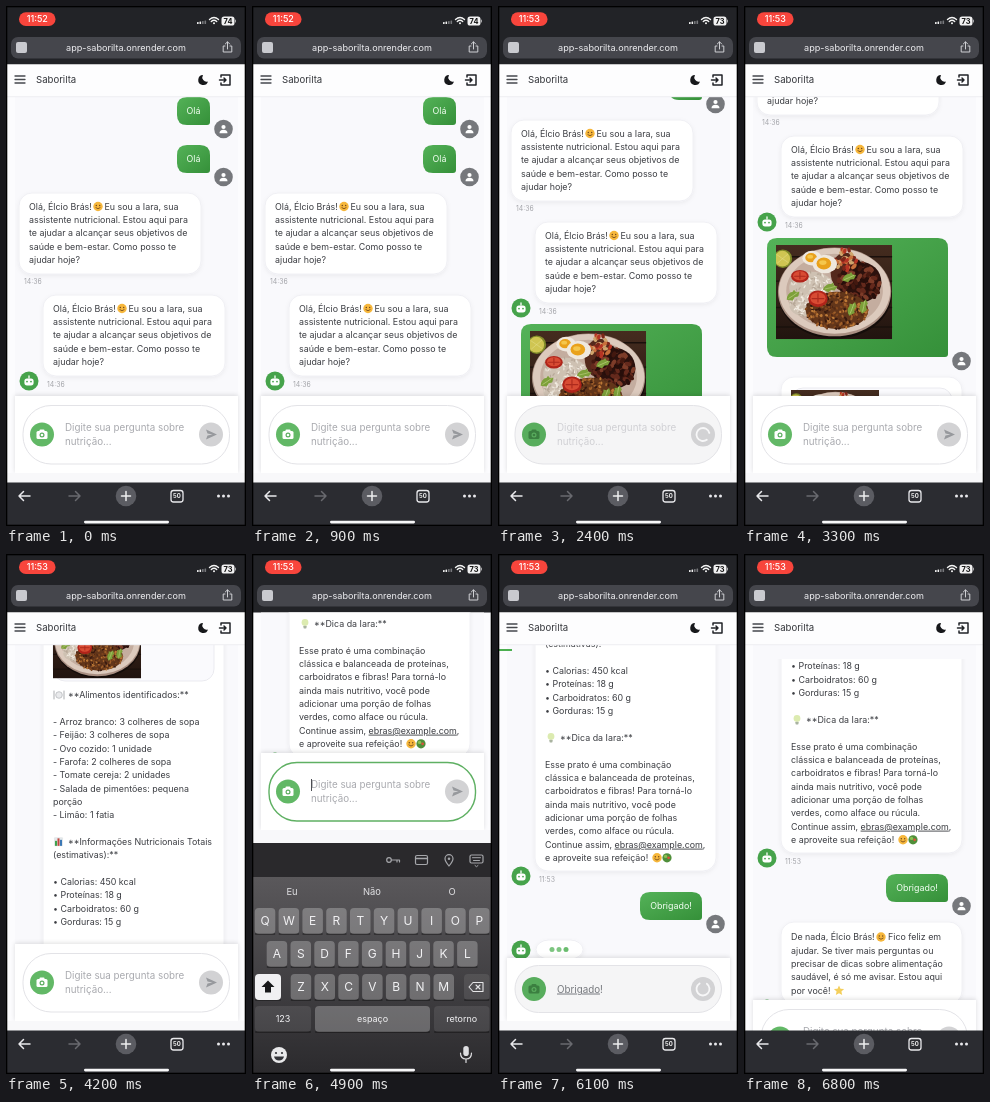
Write an HTML page that moves like this. It is 240 px wide and 520 px high and loops after 6.9 s.

```html
<!DOCTYPE html>
<html lang="pt-BR">
<head>
<meta charset="utf-8">
<title>Chat de nutrição</title>
<style>
  html, body { margin: 0; width: 100%; height: 100%; overflow: hidden; background: #000; }
  svg { display: block; width: 240px; height: 520px; font-family: Inter, "Open Sans", sans-serif; }
  text { white-space: pre; }
</style>
</head>
<body>
<svg id="stage" viewBox="0 0 240 520"></svg>
<script>
const LOOP = 6900, STEP = 100;
const LINE = 13.35, SIZE = 8.9;

// --- drawing helpers; text is placed by its vertical middle ---
const text = (x, y, s, { size = SIZE, fill = '#3b3d42', anchor = 'start', weight = 400 } = {}) =>
  `<text x="${x}" y="${y + size * 0.36}" font-size="${size}" fill="${fill}" text-anchor="${anchor}" font-weight="${weight}">${s}</text>`;
const rect = (x, y, w, h, fill, r = 0, more = '') =>
  `<rect x="${x}" y="${y}" width="${w}" height="${h}" rx="${r}" fill="${fill}" ${more}/>`;
const oval = (x, y, rx, ry, fill, more = '') =>
  `<ellipse cx="${x}" cy="${y}" rx="${rx}" ry="${ry}" fill="${fill}" ${more}/>`;
const dot = (x, y, r, fill, more = '') => oval(x, y, r, r, fill, more);
const line = (d, stroke, w = 1.4) =>
  `<path d="${d}" fill="none" stroke="${stroke}" stroke-width="${w}" stroke-linecap="round" stroke-linejoin="round"/>`;
const shape = (d, fill) => `<path d="${d}" fill="${fill}"/>`;
const group = (id, body) => `<g id="${id}">${body}</g>`;

// --- small pictures ---
const smile = (x, y) => dot(x, y, 4.7, '#f6b73c') + dot(x - 1.7, y - 1, .7, '#6b421b') +
  dot(x + 1.7, y - 1, .7, '#6b421b') + line(`M${x - 2.2} ${y + 1.2}q2.2 2.4 4.4 0`, '#6b421b', .8);
const salad = (x, y) => dot(x, y, 4.6, '#4f8f3a') + dot(x - 1.4, y - 1.4, 1.7, '#8cc152') + dot(x + 1.6, y, 1.4, '#d9533c');
const bulb = (x, y) => dot(x, y - 1.2, 3.4, '#dcebb0') + rect(x - 1.5, y + 2, 3, 2.8, '#a9b3a0', .7);
const chart = (x, y) => rect(x - 4.5, y - 4.5, 9, 9, '#e4e8ea', 1) + rect(x - 3.5, y - 1, 2, 5, '#3fa34d') +
  rect(x - 1, y - 3.5, 2, 7.5, '#c0483f') + rect(x + 1.5, y - 2, 2, 6, '#3c78b5');
const dish = (x, y) => dot(x, y, 3.3, '#e9eaec', 'stroke="#b7b9bd" stroke-width=".8"') +
  line(`M${x - 5} ${y - 4}v8M${x + 5} ${y - 4}v8`, '#a2a4a8', .9);
const star = (x, y) => shape(`M${x} ${y - 5}l1.5 3.3 3.6.4-2.7 2.4.8 3.6-3.2-1.8-3.2 1.8.8-3.6-2.7-2.4 3.6-.4z`, '#f4cf5c');

const bot = (x, y) => dot(x, y, 9.5, '#46a34b') + rect(x - 4.6, y - 2.6, 9.2, 7, '#fff', 2.6) +
  line(`M${x} ${y - 3}v-2`, '#fff', 1.3) + dot(x - 2, y + .6, .9, '#46a34b') + dot(x + 2, y + .6, .9, '#46a34b');
const person = y => dot(217.5, y, 9.3, '#76787c') + dot(217.5, y - 2, 2.1, '#fff') +
  shape(`M213.5 ${y + 4.3}q0-3.6 4-3.6t4 3.6z`, '#fff');

const card = (x, y, w, h) => rect(x, y, w, h, '#fff', 13, 'stroke="#ececf1" stroke-width=".8" filter="url(#soft)"');
const sentBox = (x, y, w, h) =>
  shape(`M${x + 10} ${y}h${w - 20}q10 0 10 10v${h - 13}q0 3-3 3h${13 - w}q-10 0-10-10v${20 - h}q0-10 10-10z`, 'url(#leaf)');
const sent = (x, y, w, s) => sentBox(x, y, w, 28) +
  text(x + w / 2, y + 14, s, { fill: '#f3fff3', anchor: 'middle' }) + person(y + 32);
const stamp = (x, y, s) => text(x, y, s, { size: 6.9, fill: '#a3a4a9' });
const lines = (x, y, list) => list.map((s, i) => s && text(x, y + i * LINE, s)).join('');

function seeded(seed) {
  return () => (seed = (seed * 16807) % 2147483647) / 2147483647;
}

function food() {
  const rnd = seeded(41);
  const scatter = (n, x, y, rx, ry, a, b, fills) => Array.from({ length: n }, (_, i) => {
    const q = rnd() * 6.283, d = Math.sqrt(rnd());
    const cx = (x + Math.cos(q) * d * rx).toFixed(1), cy = (y + Math.sin(q) * d * ry).toFixed(1);
    return oval(cx, cy, a, b, fills[i % fills.length], `transform="rotate(${(rnd() * 180) | 0} ${cx} ${cy})"`);
  }).join('');
  const leaf = (x, y, a) => `<g transform="translate(${x} ${y}) rotate(${a})">` +
    shape('M-15 3Q-9-10 2-8L6-11 8-5 15-3 9 5 2 4-4 9z', '#7da03a') + line('M-10 2Q0 0 10-3', '#b9cf7c', 1.4) + '</g>';
  const tomato = (x, y, rx, ry) => oval(x, y, rx, ry, '#b0241a') + oval(x, y - 1, rx * .78, ry * .72, '#d84b33') +
    line(`M${x - rx * .6} ${y}h${rx * 1.2}M${x} ${y - ry * .6}v${ry}`, '#ad2a1d', 2.4);
  const egg = (x, y, rx, ry) => oval(x, y, rx, ry, '#efe8de') + oval(x - 2, y - 1, rx * .6, ry * .64, '#e9a11c') +
    oval(x - 4, y - 3, rx * .3, ry * .26, '#f5c74c');
  const rice = ['#ece5da', '#b7a898', '#d9cdbf', '#f4eee4'];
  return rect(0, 0, 238, 193, 'url(#wood)') +
    [24, 74, 128, 168].map(y => line(`M0 ${y}H238`, '#1a100c', 3)).join('') +
    dot(14, 28, 19, '#7f8a28') + dot(13, 28, 16, '#cfc552') + line('M2 20L25 36M3 37L24 19', '#e6e092', 1) +
    oval(121, 102, 116, 90, '#150d0a') + oval(120, 96, 116, 91, '#a98f82') +
    oval(120, 94, 114, 88, '#dccabd') + oval(120, 94, 99, 76, '#c4ad9f') +
    oval(142, 56, 30, 40, '#54291c') +
    oval(73, 88, 46, 33, '#cec1b2') + oval(57, 122, 30, 24, '#cec1b2') +
    scatter(110, 73, 88, 45, 33, 3.6, 1.4, rice) + scatter(55, 57, 122, 29, 23, 3.6, 1.4, rice) +
    oval(172, 76, 44, 42, '#2b110d') +
    scatter(85, 172, 76, 43, 41, 6.5, 4.2, ['#43180f', '#64291c', '#270e0a', '#7d3c29']) +
    scatter(34, 143, 31, 22, 23, 5.5, 3.6, ['#b63424', '#c8703c', '#cfa56d', '#7c2619']) +
    oval(125, 134, 64, 38, '#63361a') +
    scatter(220, 125, 134, 64, 39, 3.2, 2.2, ['#a05f2a', '#532a15', '#bd7a37', '#84481d', '#37190f']) +
    egg(74, 27, 20, 15) + egg(100, 39, 25, 19) + tomato(49, 64, 18, 13) + tomato(86, 110, 20, 17) +
    leaf(35, 104, -20) + leaf(111, 88, 0) + leaf(150, 67, -10) + leaf(156, 131, -55) + leaf(180, 126, -65);
}

// --- conversation, in scroll coordinates ---
function chat() {
  const hello = (x, y) => card(x, y, 182, 81) +
    text(x + 10, y + 13.5, 'Olá, Élcio Brás!') + smile(x + 79, y + 13.5) + text(x + 85.5, y + 13.5, 'Eu sou a Iara, sua') +
    lines(x + 10, y + 13.5 + LINE, ['assistente nutricional. Estou aqui para',
      'te ajudar a alcançar seus objetivos de', 'saúde e bem-estar. Como posso te', 'ajudar hoje?']);
  const dots = (id, y) => group(id, bot(23, y + 10) + card(38, y, 47, 19) +
    [54, 61, 68].map(x => dot(x, y + 9.5, 2.5, '#4caf50', 'class="beat"')).join(''));
  const row = i => 631 + i * LINE;
  const reply = card(37, 530, 181, 488) +
    rect(47, 541, 161, 76, '#fafafd', 12, 'stroke="#e6e6ec" stroke-width=".8"') +
    '<use href="#food" transform="translate(47 543) scale(.37)"/>' +
    dish(53, row(0)) + text(62, row(0), '**Alimentos identificados:**') +
    lines(47, row(2), ['- Arroz branco: 3 colheres de sopa', '- Feijão: 3 colheres de sopa', '- Ovo cozido: 1 unidade',
      '- Farofa: 2 colheres de sopa', '- Tomate cereja: 2 unidades', '- Salada de pimentões: pequena', 'porção', '- Limão: 1 fatia']) +
    chart(52.5, row(11)) + text(62, row(11), '**Informações Nutricionais Totais') +
    lines(47, row(12), ['(estimativas):**', '', '• Calorias: 450 kcal', '• Proteínas: 18 g', '• Carboidratos: 60 g', '• Gorduras: 15 g']) +
    bulb(53, row(19)) + text(62, row(19), '**Dica da Iara:**') +
    lines(47, row(21), ['Esse prato é uma combinação', 'clássica e balanceada de proteínas,',
      'carboidratos e fibras! Para torná-lo', 'ainda mais nutritivo, você pode', 'adicionar uma porção de folhas',
      'verdes, como alface ou rúcula.',
      'Continue assim, <tspan text-decoration="underline">ebras@example.com</tspan>,', 'e aproveite sua refeição!']) +
    smile(159, row(28)) + salad(169, row(28)) + bot(23, 1023) + stamp(41, 1027, '11:53');
  const thanks = card(37, 1087, 181, 82) + text(47, 1102, 'De nada, Élcio Brás!') + smile(137, 1102) + text(144, 1102, 'Fico feliz em') +
    lines(47, 1102 + LINE, ['ajudar. Se tiver mais perguntas ou', 'precisar de dicas sobre alimentação',
      'saudável, é só me avisar. Estou aqui', 'por você!']) + star(95, 1102 + 4 * LINE) + bot(23, 1174);
  return sent(171, 91, 33, 'Olá') + sent(171, 139, 33, 'Olá') +
    hello(13, 187) + stamp(18, 276, '14:36') + hello(37, 289) + bot(23, 375) + stamp(41, 379, '14:36') +
    group('photo', sentBox(23, 391, 181, 119) + '<use href="#food" transform="translate(32 398) scale(.488)"/>' + person(514)) +
    dots('wait1', 530) + group('reply', reply) + group('sent', sent(142, 1039, 62, 'Obrigado!')) +
    dots('wait2', 1087) + group('thanks', thanks);
}

const header = rect(1, 57, 238, 34, '#fdfdfe') + rect(1, 90.4, 238, .8, '#e9e9ee') +
  line('M9 70h10M9 73.5h10M9 77h10', '#46484d', 1.3) + text(30, 73.2, 'Saborilta', { size: 9.6, fill: '#34363b' }) +
  shape('M197 69a5 5 0 1 0 5 6.5a4.4 4.4 0 0 1-5-6.5z', '#17181b') +
  line('M215 71v-2h9v10h-9v-2M213.5 74h6.5M218 72l2 2-2 2', '#222428', 1.5);

const panel = `<rect id="tray" x="9" width="223" fill="#fff" filter="url(#lift)"/>` +
  rect(1, 467, 238, 14, '#f8f8fa') +
  `<rect id="pill" x="17" width="206.5"/>` +
  group('hint', text(59, 421.5, 'Digite sua pergunta sobre', { size: 9.8, fill: 'currentColor' }) +
    text(59, 435, 'nutrição...', { size: 9.8, fill: 'currentColor' })) +
  text(59, 435, '<tspan id="word" text-decoration="underline"></tspan><tspan id="bang"></tspan>', { size: 9.8, fill: '#777a7f' }) +
  rect(59, 416, 1, 12, '#4c4e53', 0, 'id="caret"') +
  group('tools', dot(36, 428.5, 12, '#62b866', 'id="cam"') +
    group('lens', rect(30.5, 425, 11, 8, 'currentColor', 1.5) + rect(33.5, 423.4, 5, 3, 'currentColor', 1) +
      dot(36, 429, 2.5, '#5aad5e') + dot(36, 429, 1.3, 'currentColor')) +
    dot(205, 428.5, 12, '#d2d2d4') + group('arrow', shape('M200 423.5l11 5-11 5 1.5-4 5-1-5-1z', '#97999d')) +
    group('spin', line('M205 422a6.5 6.5 0 1 1-6 4', '#f7f7f8', 1.8)));

const bottomBar = rect(1, 476.5, 238, 43, '#2b2c31') +
  line('M24 490H13M17.5 485.5L13 490l4.5 4.5', '#e9e9ec', 1.5) + line('M63 490h11M69.5 485.5L74 490l-4.5 4.5', '#696a6f', 1.5) +
  dot(120, 490, 10.3, '#5b5c62') + line('M115.5 490h9M120 485.5v9', '#eeeef0', 1.5) +
  rect(165, 484.5, 12, 11.5, 'none', 2.5, 'stroke="#e9e9ec" stroke-width="1.3"') +
  text(171, 490.3, '50', { size: 6, fill: '#eee', anchor: 'middle', weight: 700 }) +
  [212.5, 217.5, 222.5].map(x => dot(x, 490, 1.5, '#e9e9ec')).join('');

const addressBar = rect(1, 1, 238, 58, '#222327') + rect(5, 31, 230, 21.5, '#45464c', 7) +
  rect(10, 36, 11, 11, '#c9cacf', 2) +
  text(120, 41.5, 'app-saborilta.onrender.com', { size: 9.1, fill: '#eeeef1', anchor: 'middle' }) +
  line('M219 40h-1.8v6h8.6v-6H224M221.5 43v-7M219.3 38l2.2-2.2 2.2 2.2', '#cfd0d4', 1);

function keyboard() {
  const light = 'rgba(255,255,255,.26)', dark = 'rgba(255,255,255,.09)', pale = '#a5a6aa';
  const key = (x, y, w, s, fill = light, size = 12) => rect(x, y + 25, w, 2, 'rgba(0,0,0,.35)', 1) + rect(x, y, w, 26, fill, 4) +
    text(x + w / 2, y + 13, s, { size, fill: '#f1f1f3', anchor: 'middle' });
  const row = (s, x, y) => [...s].map((c, i) => key(x + i * 23.8, y, 20.5, c)).join('');
  const outline = `stroke="${pale}" stroke-width="1.2"`;
  return rect(1, 289, 238, 34, '#2a292c') + rect(1, 323, 238, 197, 'url(#board)') +
    dot(137, 306, 2.3, 'none', outline) + line('M139.5 306h8v2M145 306v2', pale, 1.2) +
    rect(163.5, 301.5, 12, 9, 'none', 1.5, outline) + line('M164 304.5h11', pale, 1.5) +
    line('M197 312q-4-5-4-7.3a4 4 0 0 1 8 0q0 2.3-4 7.3z', pale, 1.2) + dot(197, 304.7, 1.3, pale) +
    rect(218, 301, 13, 8, 'none', 1.5, outline) +
    line('M220.5 303.7h8M221.5 306.5h6M223 311.5l1.5 1.2 1.5-1.2', pale, 1) +
    ['Eu', 'Não', 'O'].map((s, i) => text(40 + i * 80, 338, s, { size: 9.4, fill: '#e1e1e4', anchor: 'middle' })).join('') +
    row('QWERTYUIOP', 2.8, 354) + row('ASDFGHJKL', 14.7, 387) + row('ZXCVBNM', 38.7, 420) +
    key(3, 420, 26, '', '#f0f0f2') + shape('M16 426.5l6.5 6.5H19v5.5h-6V433H9.5z', '#17181a') +
    key(212, 420, 25.5, '', dark) + line('M217 433l4-4.5h10v9h-10zM224 431l4 4M228 431l-4 4', '#e6e6e8', 1.1) +
    key(3, 452, 56, '123', dark, 9) + key(63, 452, 115, 'espaço', light, 9) + key(182, 452, 55.5, 'retorno', dark, 9) +
    dot(27, 501, 8, '#e9e9eb') + dot(24, 499, 1.1, '#323338') + dot(30, 499, 1.1, '#323338') + shape('M22 502.5h10q-1 4-5 4t-5-4z', '#323338') +
    rect(211.3, 492, 5.5, 10, '#dedee1', 2.8) + line('M208.5 499q0 6 5.5 6t5.5-6M214 505v3.5', '#dedee1', 1.2);
}

const picker = rect(0, 0, 240, 520, '#000') + rect(12, 29, 216, 20, '#1b1b1d', 6) + rect(1, 35, 238, 485, '#1e1b1f', 7) +
  rect(1, 35, 238, 32, '#2a2a2d', 7) + rect(1, 60, 238, 7, '#2a2a2d') +
  text(12, 51.5, 'Cancelar', { size: 9.4, fill: '#85868b' }) +
  text(120, 51.5, '1 Foto Selecionada', { size: 9.2, fill: '#f4f4f5', anchor: 'middle', weight: 600 }) +
  text(229, 51.5, 'OK', { size: 9.4, fill: '#98999e', anchor: 'end', weight: 600 }) +
  '<use href="#food" transform="translate(1 182)"/>' + dot(227, 358.5, 6, 'none', 'stroke="#fff" stroke-width="1.7"') +
  rect(1, 472, 238, 48, '#29292c');

const status = rect(13, 6.3, 36.5, 13.7, '#f8453c', 6.8) +
  `<text id="clock" x="31.3" y="16.4" font-size="9" fill="#fff" text-anchor="middle" font-weight="500"></text>` +
  [191, 193.5, 196, 198.5].map((x, i) => rect(x, 16 - i * .5, 1.6, 2 + i * .5, i < 2 ? '#f0f0f0' : '#77787c', .5)).join('') +
  line('M203.5 13.5q4.5-4 9 0M205.3 15.5q2.7-2.4 5.4 0', '#f5f5f5', 1.4) + dot(208, 17.3, 1, '#f5f5f5') +
  rect(215.5, 10.5, 13, 9, '#f1f1f2', 2.6) + rect(229, 13.5, 1, 3, '#a5a5a8', .5) +
  `<text id="power" x="222" y="17.7" font-size="7.4" fill="#111" text-anchor="middle" font-weight="700"></text>`;

document.getElementById('stage').innerHTML = `<defs>
  <linearGradient id="leaf" x2="1" y2="1"><stop stop-color="#54b258"/><stop offset="1" stop-color="#359039"/></linearGradient>
  <linearGradient id="board" x2="0" y2="1"><stop stop-color="#5a585b"/><stop offset="1" stop-color="#2b2a2d"/></linearGradient>
  <linearGradient id="wood" x2="0" y2="1"><stop stop-color="#452c1f"/><stop offset="1" stop-color="#21140f"/></linearGradient>
  <filter id="soft" x="-10%" y="-10%" width="120%" height="125%"><feDropShadow dx="0" dy="1.5" stdDeviation="2" flood-opacity=".06"/></filter>
  <filter id="lift" x="-5%" y="-20%" width="110%" height="140%"><feDropShadow dx="0" dy="-1" stdDeviation="2" flood-opacity=".12"/></filter>
  <clipPath id="view">${rect(1, 58.5, 238, 421, '#000')}</clipPath>
  <clipPath id="chatClip">${rect(9, 91, 223, 389, '#000', 0, 'id="chatBox"')}</clipPath>
  <clipPath id="foodClip">${rect(0, 0, 238, 193, '#000')}</clipPath>
  <g id="food" clip-path="url(#foodClip)">${food()}</g></defs>` +
  rect(0, 0, 240, 520, '#000') + addressBar +
  `<g clip-path="url(#view)">${group('page',
    rect(1, 57, 238, 424, '#fcfcfe') + rect(9, 91, 223, 390, '#f9f9fc') + rect(1, 95, 13, 2, '#4caf50', 0, 'id="load"') +
    `<g clip-path="url(#chatClip)">${group('scroll', chat())}</g>` + header + group('panel', panel))}</g>` +
  bottomBar + group('keys', keyboard()) + group('picker', picker) + status +
  rect(78, 514.8, 85, 2.6, '#f7f7f8', 1.3) + rect(0, 0, 240, 520, 'none', 0, 'stroke="#000" stroke-width="2.6"');

// --- motion ---
const $ = Object.fromEntries([...document.querySelectorAll('[id]')].map(e => [e.id, e]));
const beats = [...document.querySelectorAll('.beat')];

const SCROLL = [[2200, 73], [2500, 73], [2700, 159], [3300, 159], [4200, 490], [4600, 624], [5700, 624], [5900, 701], [6400, 701], [6700, 719]];
const DROP = [[6500, 0], [6700, 56]];
const SHOWN = {
  picker: [1000, 2200], photo: [2200, LOOP], wait1: [2500, 3200], reply: [3200, LOOP],
  keys: [4700, 5700], sent: [5700, LOOP], wait2: [5800, 6400], load: [5800, 6400], thanks: [6400, LOOP]
};

function at(track, t) {
  const i = track.findIndex(k => k[0] > t);
  if (i < 0) return track[track.length - 1][1];
  if (i === 0) return 0;
  const [t0, a] = track[i - 1], [t1, b] = track[i];
  return a + (b - a) * (t - t0) / (t1 - t0);
}
const within = (t, [a, b]) => t >= a && t < b;
const show = (e, on) => e.setAttribute('display', on ? 'inline' : 'none');
const move = (e, y) => e.setAttribute('transform', `translate(0 ${y})`);
const set = (e, attrs) => { for (const k in attrs) e.setAttribute(k, attrs[k]); };

function render(t) {
  const focus = within(t, SHOWN.keys);
  const busy = within(t, [2200, 3200]) || within(t, [5700, 6400]);
  const typed = within(t, [5000, 6400]) ? 'Obrigado!'.slice(0, Math.floor((t - 5000) / 60) + 1) : '';
  const short = typed !== '';

  for (const id in SHOWN) show($[id], within(t, SHOWN[id]));
  move($.scroll, -at(SCROLL, t));
  move($.page, focus ? -191 : 0);
  move($.panel, at(DROP, t));
  const top = t >= 6600 ? 105 : 91;
  set($.chatBox, { y: top, height: 480 - top });

  set($.tray, { y: short ? 404 : 390, height: short ? 63 : 77 });
  set($.pill, {
    y: short ? 411.5 : 399.5, height: short ? 47 : 58.5, rx: short ? 23.5 : 28,
    fill: busy ? '#f5f5f6' : '#fff', stroke: focus ? '#5fb063' : '#e3e3e7', 'stroke-width': focus ? 1.4 : 1
  });
  move($.tools, short ? 6.5 : 0);
  show($.hint, !short);
  $.hint.style.color = busy ? '#d0d0d4' : '#a9aaaf';
  $.word.textContent = typed.replace('!', '');
  $.bang.textContent = typed.endsWith('!') ? '!' : '';
  show($.caret, focus && !short);
  $.cam.setAttribute('fill', busy ? '#58ad5d' : '#62b866');
  $.lens.style.color = busy ? '#3b7f40' : '#fff';
  show($.arrow, !busy);
  show($.spin, busy);
  $.spin.setAttribute('transform', `rotate(${t * 0.36 % 360} 205 428.5)`);
  beats.forEach((e, i) => e.setAttribute('opacity', 0.85 + 0.15 * Math.cos(t / 160 - i)));

  $.clock.textContent = t < 2200 ? '11:52' : '11:53';
  $.power.textContent = t < 2200 ? '74' : '73';
}

const start = performance.now();
function tick() {
  const t = (performance.now() - start) % LOOP;
  render(Math.floor(t / STEP) * STEP);
  requestAnimationFrame(tick);
}
tick();
</script>
</body>
</html>
```
